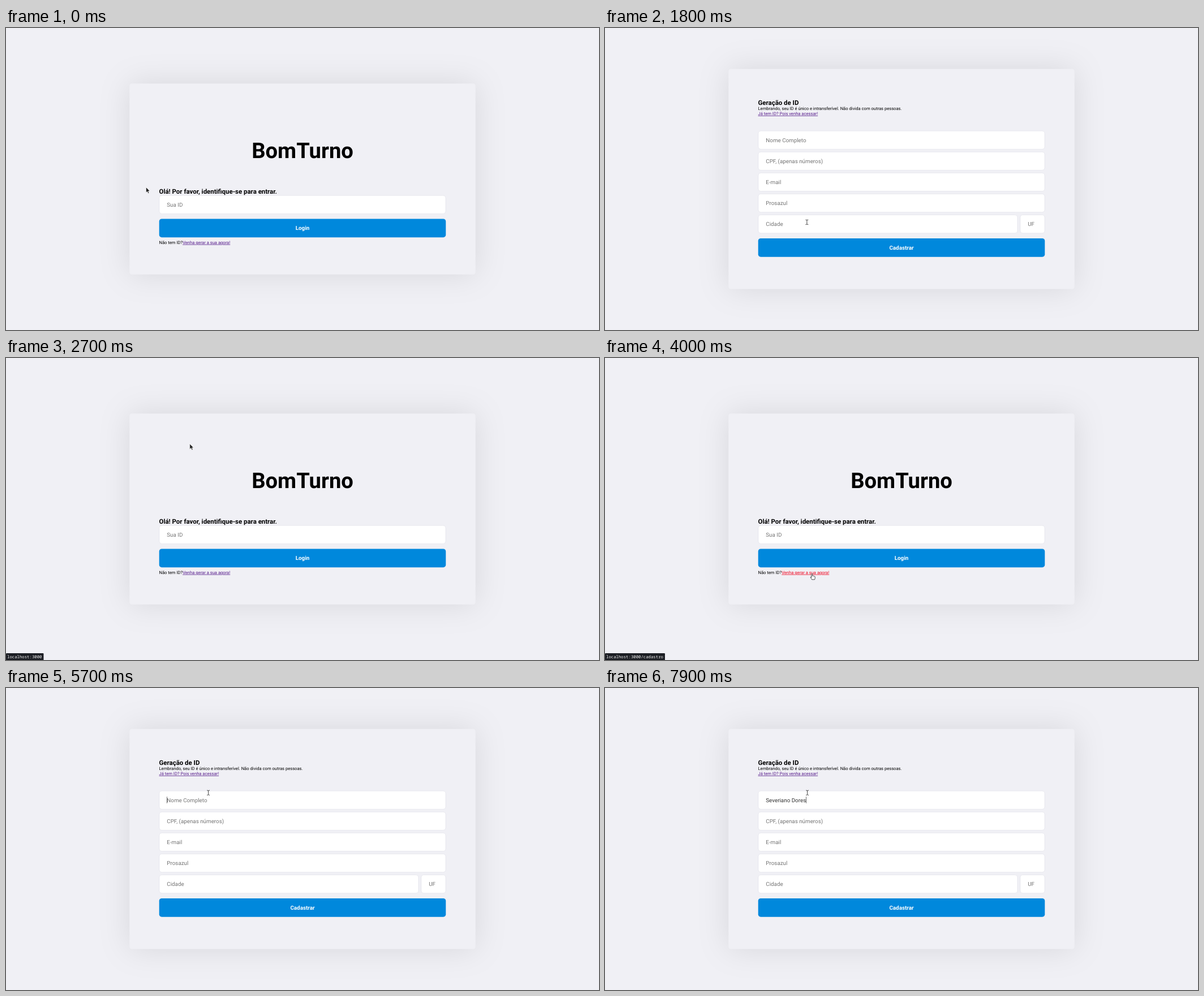
An HTML page for the animation above (8 s loop, 1048x534 px).

```html
<!DOCTYPE html>
<html lang="pt-BR">
<head>
<meta charset="utf-8">
<style>
html, body { margin: 0; height: 100%; overflow: hidden; background: #f0f0f5; }
svg { display: block; width: 100vw; height: 100vh; }
text { font: 9.825px Roboto, sans-serif; text-rendering: geometricPrecision; white-space: pre; }
.card { fill: #f0f0f5; filter: drop-shadow(0 0 27.3px rgba(0, 0, 0, .1)); }
.field { fill: #fff; stroke: #dcdce6; stroke-width: .55; }
.hint { fill: #757575; }
.button { fill: #0088dc; }
.label { fill: #fff; font-weight: 700; text-anchor: middle; }
.logo { font-size: 38.2px; font-weight: 700; text-anchor: middle; }
.heading { font-size: 11.46px; font-weight: 700; }
.small { font-size: 7.64px; }
.link { fill: #551a8b; text-decoration: underline; }
.link.active { fill: #f0001c; }
#typed, #caret { fill: #333; }
#status rect { fill: #1c1e24; }
#status text { fill: #f4f4f4; font: 7.32px "Noto Sans Mono", monospace; }
#cursor path { stroke-linejoin: round; stroke-linecap: round; }
</style>
</head>
<body>
<svg viewBox="0 0 1048 534">
  <g id="login"></g>
  <g id="signup"></g>
  <g id="status"><rect y="522" height="13" rx="1.2"/><text x="2" y="530.6"></text></g>
  <g id="cursor">
    <path id="arrow" d="M0 0V9.2L2.2 7.3L3.8 10.7L5.4 10L3.9 6.7H6.6Z" fill="#222" stroke="#fff" stroke-width=".6"/>
    <path id="hand" transform="translate(.8 -.4)" d="M-.9 5.6V.2Q-.9-.8 0-.8T.9.2V3.2Q1.8 2.7 2.5 3.4Q3.4 3 4 3.8Q5.4 3.6 5.4 5V7Q5.4 8 4.7 9.6H-.2Q-.8 8-2.6 6Q-2.8 4.6-1.7 4.9Z" fill="#fff" stroke="#222" stroke-width=".8"/>
    <path id="beam" d="M-2-4.2Q0-4.2 0-3.4Q0-4.2 2-4.2M0-3.4V3.4M-2 4.2Q0 4.2 0 3.4Q0 4.2 2 4.2" fill="none" stroke="#333" stroke-width=".9"/>
  </g>
</svg>
<script>
const $ = id => document.getElementById(id);
const LEFT = 270.7, WIDTH = 506.6, ROW = 32.75, PITCH = 37.12, FIRST = 181.8;
const rowY = i => FIRST + i * PITCH;

const text = (cls, x, y, str, id = "") => `<text class="${cls}" id="${id}" x="${x}" y="${y}">${str}</text>`;
const box = (cls, x, y, w, h = ROW) => `<rect class="${cls}" x="${x}" y="${y}" width="${w}" height="${h}" rx="4.4"/>`;
const card = h => box("card", 218.3, 267 - h / 2, 611.4, h);
const field = (str, y, x = LEFT, w = WIDTH, id) =>
  box("field", x + .27, y + .27, w - .54, ROW - .54) + text("hint", x + 13.6, y + 19.9, str, id);
const button = (str, y) => box("button", LEFT, y, WIDTH) + text("label", 524, y + 19.9, str);

$("login").innerHTML = card(337.4)
  + text("logo", 524, 230, "BomTurno")
  + text("heading", 270.5, 293.2, "Olá! Por favor, identifique-se para entrar.")
  + field("Sua ID", 295.9) + button("Login", 337.4)
  + text("small", 270.5, 381.7, 'Não tem ID?<tspan class="link" id="join">Venha gerar a sua agora!</tspan>');

const labels = ["Nome Completo", "CPF, (apenas números)", "E-mail", "Prosazul"];
$("signup").innerHTML = card(389)
  + text("heading", 270.5, 135.6, "Geração de ID")
  + text("small", 270.5, 145.1, "Lembrando, seu ID é único e intransferível. Não divida com outras pessoas.")
  + text("small link", 270.5, 153.9, "Já tem ID? Pois venha acessar!")
  + labels.map((str, i) => field(str, rowY(i), LEFT, WIDTH, i ? "" : "hint")).join("")
  + field("Cidade", rowY(4), LEFT, 458.5) + field("UF", rowY(4), 733.6, 43.7)
  + button("Cadastrar", 371.9)
  + text("", 284.3, 201.7, "", "typed")
  + '<rect id="caret" y="192.2" width=".7" height="11.6"/>';

const name = "Severiano Dores";
// pointer trips between resting points; bend swings the path to the right
const trips = [
  { from: 100, to: 1000, x: 362.8, y: 378.8 },
  { from: 1600, to: 2400, x: 324.8, y: 152 },
  { from: 2700, to: 3900, x: 365, y: 382.6, bend: 40 },
  { from: 4000, to: 4200, x: 357.6, y: 185.2 }
];
// links under the pointer and the address each one shows
const hovers = [
  { from: 1000, to: 1600, page: "/cadastro" },
  { from: 2400, to: 3000, page: "" },
  { from: 3900, to: 4100, page: "/cadastro" }
];

const show = (id, on) => $(id).style.display = on ? "" : "none";
const within = (v, a, b) => v >= a && v < b;
const inRow = (v, top) => within(v, top, top + ROW);
const ramp = (t, a, b) => Math.min(1, Math.max(0, (t - a) / (b - a)));
const ease = k => k * k * (3 - 2 * k);

function pointer(t) {
  let x = 247.5, y = 281.8;
  for (const trip of trips) {
    const k = ease(ramp(t, trip.from, trip.to));
    x += (trip.x - x) * k + (trip.bend ?? 0) * Math.sin(Math.PI * k);
    y += (trip.y - y) * k;
  }
  return [x, y];
}

function pointerKind(x, y, second) {
  if (x < LEFT) return "arrow";
  if (second) {
    if (within(y, 146.5, 156) || inRow(y, 371.9)) return "hand";
    return [0, 1, 2, 3, 4].some(i => inRow(y, rowY(i))) ? "beam" : "arrow";
  }
  if (inRow(y, 337.4) || x > 312 && within(y, 374, 384)) return "hand";
  return inRow(y, 295.9) ? "beam" : "arrow";
}

// three bursts of typing: 1 to 7, 7 to 11 and 11 to 15 letters
const letters = t => t < 6000 ? 0 :
  Math.round(1 + 6 * ramp(t, 6200, 6600) + 4 * ramp(t, 6600, 7400) + 4 * ramp(t, 7500, 7900));

function drawStatus(t) {
  const hover = hovers.find(h => within(t, h.from, h.to + 100));
  show("status", hover);
  if (!hover) return;
  const bar = $("status"), address = "localhost:3000" + hover.page;
  bar.style.opacity = t < hover.to ? ramp(t, hover.from - 100, hover.from + 100) : .5;
  bar.firstChild.setAttribute("width", 5 + address.length * 4.39);
  bar.lastChild.textContent = address;
}

function draw(now) {
  const t = Math.floor(now % 8000 / 100) * 100;
  const second = within(t, 1600, 2700) || t >= 4100;
  show("login", !second);
  show("signup", second);
  $("join").classList.toggle("active", within(t, 1400, 1600) || within(t, 3900, 4100));
  drawStatus(t);

  const typed = $("typed"), count = letters(t);
  typed.textContent = name.slice(0, count);
  show("hint", !count);
  show("caret", within(t, 4500, 5100) || t >= 5700);
  $("caret").setAttribute("x", 284.3 + (count && typed.getComputedTextLength()));

  const [x, y] = pointer(t), kind = pointerKind(x, y, second);
  $("cursor").setAttribute("transform", `translate(${x} ${y})`);
  for (const k of ["arrow", "hand", "beam"]) show(k, k === kind);
}

let start;
function frame(now) {
  start ??= now;
  draw(now - start);
  requestAnimationFrame(frame);
}
requestAnimationFrame(frame);
</script>
</body>
</html>
```
